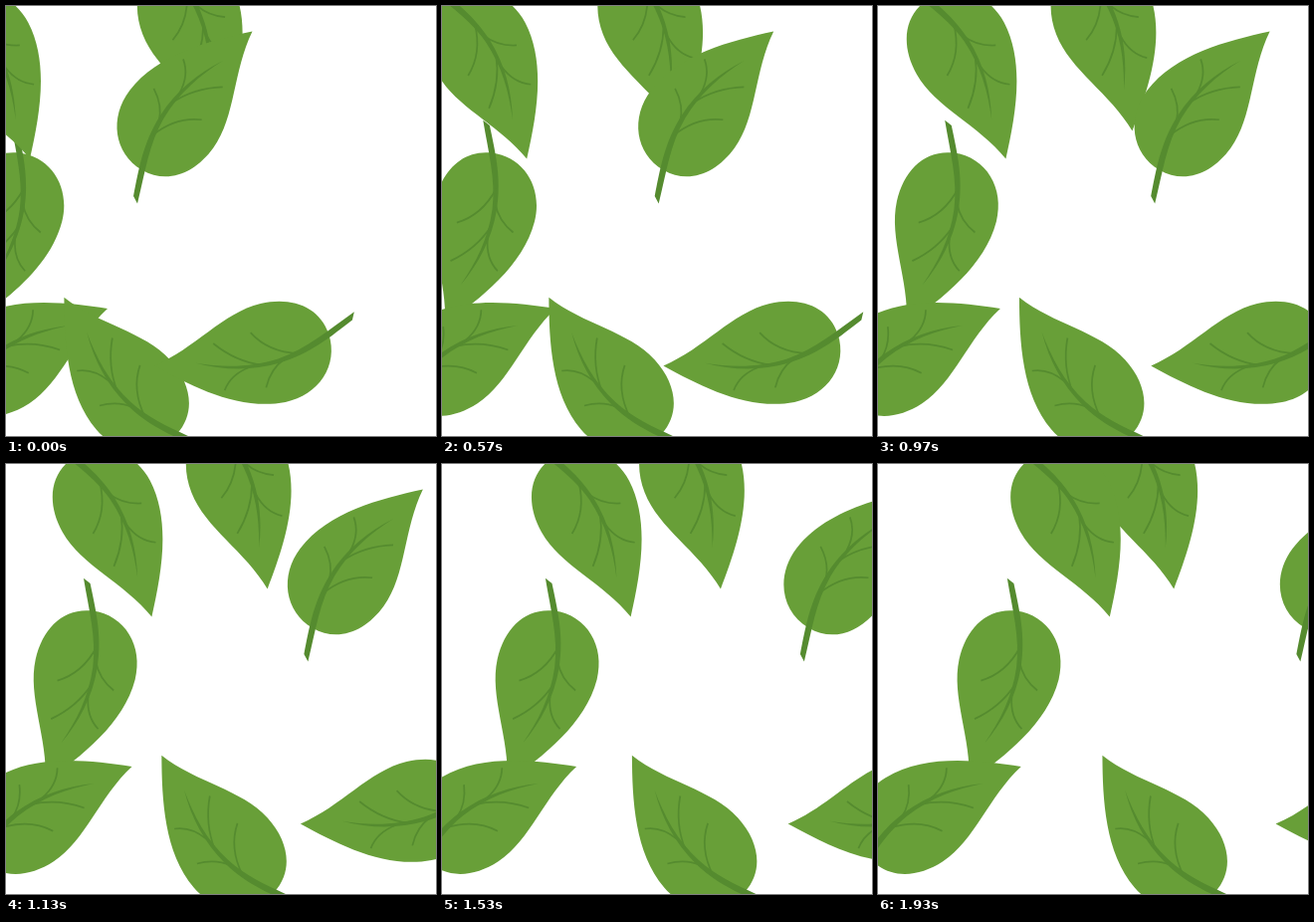
These frames come from a looping animation (432 by 432 pixels, 1.96 s). An HTML page:

```html
<!DOCTYPE html>
<html lang="en">
<head>
<meta charset="utf-8">
<title>Drifting leaves</title>
<style>
  html, body { margin: 0; width: 100%; height: 100%; overflow: hidden; background: #fff; }
  svg { display: block; width: 100vw; height: 100vh; }
</style>
</head>
<body>
<svg id="stage" viewBox="0 0 432 432">
  <defs>
    <!-- Leaf tip at the origin, stem pointing along +x -->
    <g id="leaf">
      <path fill="#689f38" d="M0 0C32.5 31 72 66 118 69C152 71 179.5 47 177.5 14C175.5 -15 151 -32 119 -33C80 -34 44 -6 0 0Z"/>
      <path fill="#558b2f" d="M208 -1L204 6.5C180 16.5 155 28.5 122 29.5C92 30 66 22 41 8C66 19 92 26.5 122 25C152 23 178 10 208 -1Z"/>
      <path fill="none" stroke="#558b2f" stroke-width="1.7"
        d="M143 25Q114 16 102 -7.5M105 27Q80 17 63 -6.5M128 27Q112 33 103 50M92 26Q72 28 62 42"/>
    </g>
  </defs>
</svg>
<script>
const LOOP = 1960;
const STEP = 0.72; // px per tick for a leaf of speed 1

// Back to front: tip position at the start, rotation, relative speed
const leaves = [
  { x: -33.8, y: 319.2, angle: -79.1, speed: 3 },
  { x: 102, y: 304, angle: 145, speed: 1 },
  { x: 213.7, y: 125.5, angle: -112.7, speed: 2 },
  { x: 58.4, y: 292.7, angle: 46, speed: 4 },
  { x: 24, y: 153.5, angle: -121, speed: 5 },
  { x: 149, y: 361.4, angle: -14.8, speed: 6 },
  { x: 247.5, y: 25.5, angle: 124, speed: 7 }
];

const stage = document.getElementById('stage');
for (const leaf of leaves) {
  leaf.node = document.createElementNS('http://www.w3.org/2000/svg', 'use');
  leaf.node.setAttribute('href', '#leaf');
  stage.append(leaf.node);
}

// 30 ticks per second, each starting on a multiple of 10 ms
const tickAt = ms => Math.floor((Math.floor(ms / 10) * 10 + 5) * 0.03);

function render(ms) {
  const tick = tickAt(ms % LOOP);
  for (const { node, x, y, angle, speed } of leaves) {
    node.setAttribute('transform', `translate(${x + tick * speed * STEP} ${y}) rotate(${angle})`);
  }
}

const start = performance.now();
function loop() {
  render(performance.now() - start);
  requestAnimationFrame(loop);
}
loop();
</script>
</body>
</html>
```
